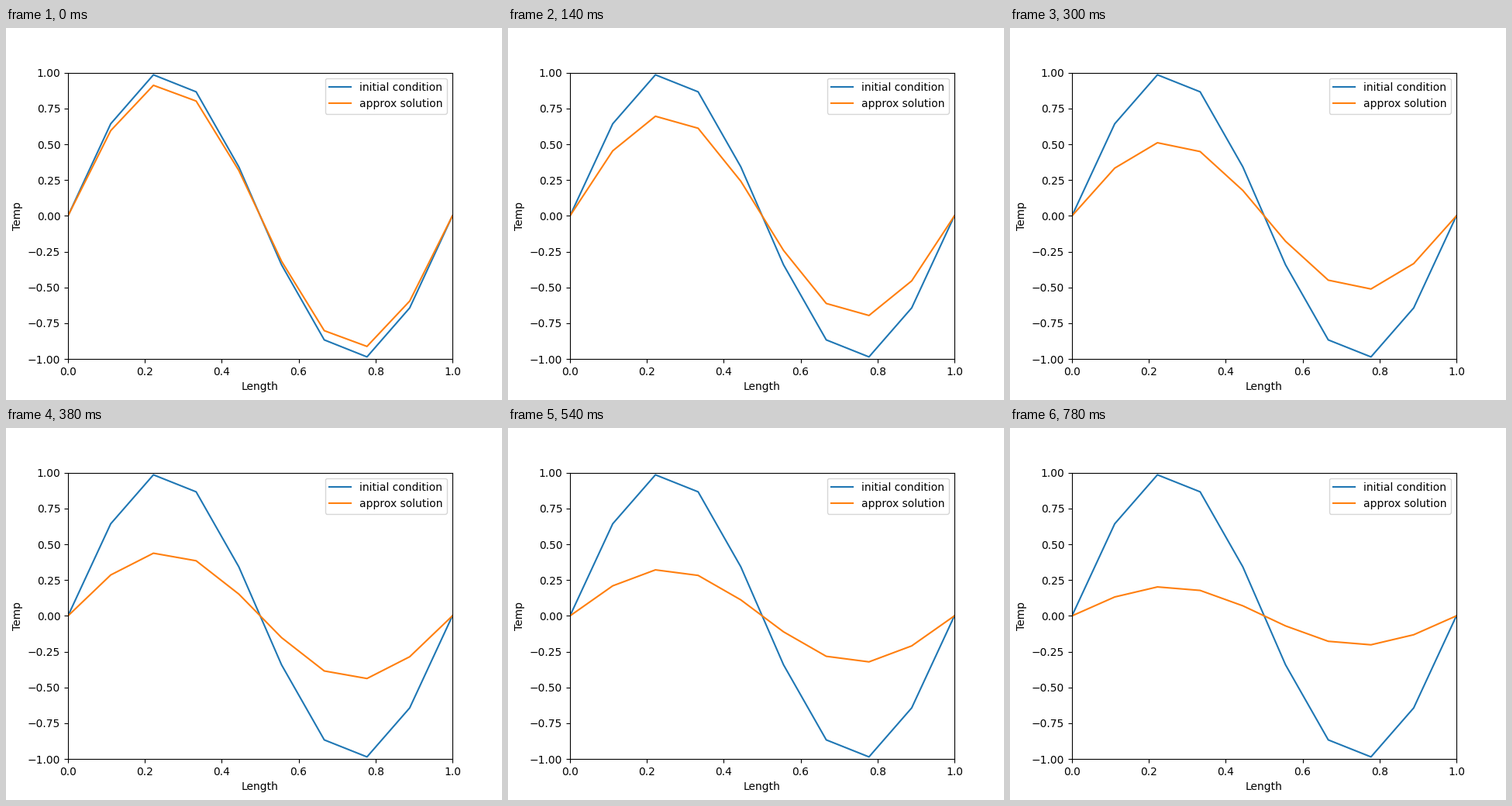
Animation of 640 by 480 pixels, one loop 0.8 s. Source, as a matplotlib script:

```python
import numpy as np
import matplotlib.pyplot as plt
from matplotlib.animation import FuncAnimation

FRAMES = 40
INTERVAL = 20  # ms
POINTS = 10
DT = 0.001

x = np.linspace(0, 1, POINTS)
start = np.sin(2 * np.pi * x)
dx = x[1] - x[0]


def step(u):
    """One explicit step of the heat equation with fixed ends."""
    nxt = u.copy()
    nxt[1:-1] += DT / dx**2 * (u[2:] - 2 * u[1:-1] + u[:-2])
    return nxt


# The first frame already shows two steps of cooling.
states = [step(step(start))]
while len(states) < FRAMES:
    states.append(step(states[-1]))

fig, ax = plt.subplots(figsize=(6.4, 4.8), dpi=100)
ax.set(xlim=(0, 1), ylim=(-1, 1), xlabel="Length", ylabel="Temp")
ax.plot(x, start, label="initial condition")
approx, = ax.plot(x, states[0], label="approx solution")
ax.legend(loc="upper right")


def update(i):
    approx.set_ydata(states[i])
    return approx,


anim = FuncAnimation(fig, update, frames=FRAMES, interval=INTERVAL,
                     repeat=True, repeat_delay=0)
plt.show()
```
